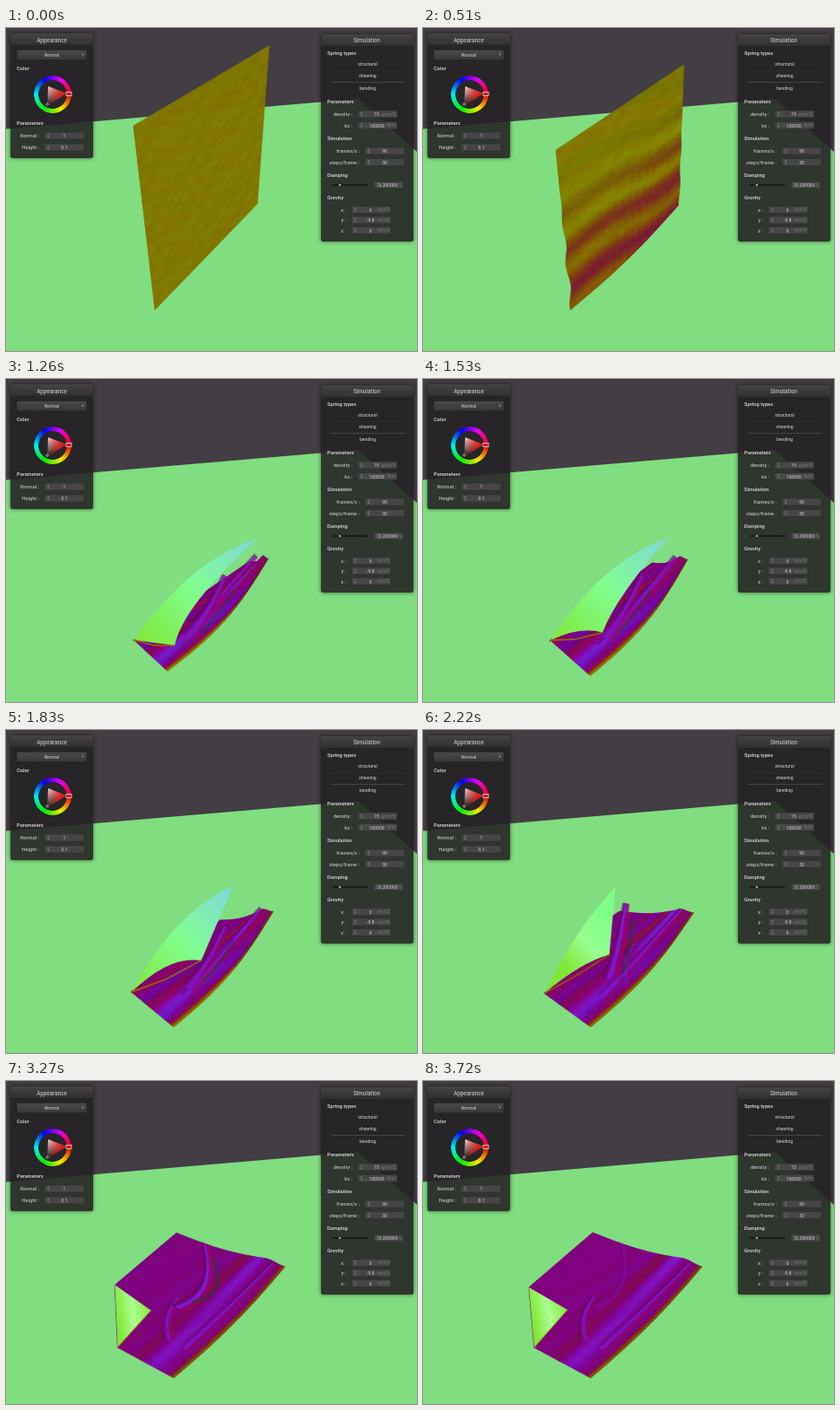
Animation of 458 by 360 pixels, one loop 3.75 s. Source, as an HTML page with a canvas:

```html
<!DOCTYPE html>
<html lang="en">
<head>
<meta charset="utf-8">
<title>Cloth simulation</title>
<style>
  html, body { margin: 0; width: 100%; height: 100%; overflow: hidden; background: #433e43; }
  #stage { position: relative; width: 458px; height: 360px; overflow: hidden; }
  canvas, svg { position: absolute; left: 0; top: 0; display: block; }
  .panel { position: absolute; box-sizing: border-box; border-radius: 2px;
    background: rgba(36, 34, 36, .89); box-shadow: 0 0 4px rgba(0, 0, 0, .6); }
  .panel::before { content: ""; display: block; height: 14px; border-radius: 2px 2px 0 0;
    background: linear-gradient(#444, #303030); border-bottom: 1px solid #242424; box-sizing: border-box; }
  #ring { position: absolute; left: 31px; top: 53px; width: 42px; height: 42px; border-radius: 50%; opacity: .92;
    background: conic-gradient(from 90deg, red, #ff0, #0f0, #0ff, #00f, #f0f, red);
    -webkit-mask: radial-gradient(circle, transparent 15.5px, #000 16.2px);
    mask: radial-gradient(circle, transparent 15.5px, #000 16.2px); }
  text { font-family: Roboto, "Open Sans", sans-serif; font-size: 5px; fill: #b8b8b8; dominant-baseline: central; }
  .title { font-size: 6.3px; font-weight: 500; text-anchor: middle; }
  .head { font-size: 5.7px; font-weight: 700; fill: #c4c4c4; }
  .label { font-size: 5.6px; font-weight: 500; text-anchor: end; }
  .mid { text-anchor: middle; font-weight: 500; }
  .unit { fill: #7c7c7c; font-size: 4.6px; text-anchor: end; }
</style>
</head>
<body>
<div id="stage">
  <canvas id="view" width="458" height="360"></canvas>
  <div class="panel" style="left:5px;top:6px;width:92px;height:139px"></div>
  <div class="panel" style="left:351px;top:7px;width:103px;height:231px"></div>
  <div id="ring"></div>
  <svg id="ui" width="458" height="360" viewBox="0 0 458 360">
    <defs>
      <linearGradient id="btn" x2="0" y2="1"><stop stop-color="#4a4a4a"/><stop offset="1" stop-color="#383838"/></linearGradient>
      <linearGradient id="tri" gradientUnits="userSpaceOnUse" x1="46" y1="66" x2="50" y2="87">
        <stop stop-color="#eee"/><stop offset="1" stop-color="#080808"/></linearGradient>
      <linearGradient id="hue" gradientUnits="userSpaceOnUse" x1="45" y1="76" x2="67" y2="73">
        <stop stop-color="#f00" stop-opacity="0"/><stop offset="1" stop-color="#f00"/></linearGradient>
    </defs>
    <text class="title" x="51" y="13.500">Appearance</text>
    <rect x="12" y="24.500" width="78" height="11" rx="1.500" fill="url(#btn)" stroke="#262626" stroke-width=".6"/>
    <text class="mid" x="51" y="30">Normal</text>
    <path d="M85 28v3l1.500-1.500z" fill="#aaa"/>
    <text class="head" x="12" y="45">Color</text>
    <path d="M67 73L46 87L47 65Z" fill="url(#tri)"/>
    <path d="M67 73L46 87L47 65Z" fill="url(#hue)"/>
    <rect x="67" y="71.500" width="6" height="4" fill="none" stroke="#ddd" stroke-width=".8"/>
    <circle cx="46" cy="85" r="1.300" fill="none" stroke="#ddd" stroke-width=".6"/>
    <text class="head" x="12" y="106">Parameters</text>
    <text class="title" x="402" y="13.500">Simulation</text>
    <text class="head" x="358" y="28">Spring types</text>
    <text class="mid" x="403" y="39.800">structural</text>
    <text class="mid" x="403" y="53.200">shearing</text>
    <text class="mid" x="403" y="66.700">bending</text>
    <path d="M362 47.500h83" stroke="#2e2e2e" stroke-width=".8"/>
    <path d="M362 60.500h83" stroke="#4c4c4c" stroke-width=".8"/>
    <text class="head" x="358" y="82">Parameters</text>
    <text class="head" x="358" y="123">Simulation</text>
    <text class="head" x="358" y="164">Damping</text>
    <path d="M364 175h39" stroke="#1c1c1c" stroke-width="2"/>
    <circle cx="372" cy="175" r="2" fill="#999" stroke="#181818"/>
    <text class="head" x="358" y="189">Gravity</text>
  </svg>
</div>
<script>
const ctx = document.getElementById('view').getContext('2d');
const LOOP = 3750, STEP = 30, ROWS = 64, COLS = 16;
const { PI, sin, cos, sqrt, exp } = Math;

// Number fields: label, value, unit, left, centre y, width
function field(label, value, unit, x, y, w = 44) {
  const mid = x + w * (unit ? .48 : .5);
  document.getElementById('ui').insertAdjacentHTML('beforeend',
    `<text class="label" x="${x - 6}" y="${y}">${label}</text>
     <rect x="${x}" y="${y - 4}" width="${w}" height="8" rx="1" fill="#464646" stroke="#2b2b2b" stroke-width=".5"/>
     <path d="M${x + 3} ${y - .8}l1.200-1.800 1.200 1.800zm0 1.600l1.200 1.800 1.200-1.800z" fill="#888"/>
     <text class="mid" x="${mid}" y="${y}">${value}</text>
     <text class="unit" x="${x + w - 2}" y="${y}">${unit}</text>`);
}
field('Normal :', '1', '', 43, 120);
field('Height :', '0.1', '', 43, 133);
field('density :', '15', 'g/cm^2', 392, 96);
field('ks :', '100000', 'N/m', 392, 108.5);
field('frames/s :', '90', '', 400, 137);
field('steps/frame :', '30', '', 400, 149.5);
field('', '0.200000', '%', 410, 175, 33);
['x', 'y', 'z'].forEach((axis, i) =>
  field(axis + ' :', axis === 'y' ? '-9.8' : '0', 'm/s^2', 385, 202.5 + 11.5 * i));

const clamp = (x, a = 0, b = 1) => Math.min(b, Math.max(a, x));
const smooth = (a, b, x) => { const p = clamp((x - a) / (b - a)); return p * p * (3 - 2 * p); };
const bump = (x, at, w) => exp(-(((x - at) / w) ** 2));
const mix = (a, b, k) => a.length ? a.map((v, i) => v + (b[i] - v) * k) : a + (b - a) * k;
const add = ([x, y], dx, dy) => [x + dx, y + dy];

// Surface colour of a normal pitched by the given angle, with a sideways lean
function shade(pitch, lean = 0, alpha = 1) {
  const n = [lean, sin(pitch), -cos(pitch)].map(c => Math.round(clamp(127.5 * (1 + c), 0, 255)));
  return `rgba(${n},${alpha})`;
}

function line(points) {
  ctx.beginPath();
  points.forEach(p => ctx.lineTo(...p));
}

// Corners and stages of the motion; t in seconds
function pose(t) {
  const land = smooth(1, 1.26, t);
  const open = smooth(1.26, 3.46, t);
  const unfold = smooth(1.8, 2.6, t);
  const swing = sin(PI * sqrt(open)) ** 2;
  const bl = mix([166, 314], [187, 331], smooth(.7, 1.6, t));
  const br = mix([280, 196], [311, 207], clamp(t / 3.2));
  const tip = add(mix([280, 178], [118, 230], open), 0, -25 * sin(PI * open));
  const outer = mix([143, 291], [124, 297], open);
  const inner = add(mix([188, 297], [161, 255], open), 37 * swing, -36 * swing);
  // Free fall of the top edge, then the landed cloth
  const fallL = [142 + 12 * t, 109 + 104 * t * t], fallR = [293 - 5 * t, 20 + 82 * t * t];
  const backR = add(mix([272, 203], [189, 169], sqrt(open)), 0, 25 * swing);
  const tl = mix(fallL, mix(outer, tip, unfold), land);
  const tr = mix(fallR, backR, land);
  const ml = mix(mix(tl, bl, .5), outer, land);
  return { t, land, open, unfold, tip, outer, inner, tl, tr, ml, bl, br };
}

function scene() {
  ctx.fillStyle = '#433e43';
  ctx.fillRect(0, 0, 458, 360);
  ctx.fillStyle = '#80dd80';
  line([[0, 112.5], [392, 79], [458, 138], [458, 360], [0, 360]]);
  ctx.fill();
}

function sheet({ t, land, open, tl, tr, ml, bl, br }) {
  const crumple = Math.min(1.2, (t / .81) ** 2);
  const bow = Math.min(1, crumple) * mix(7, 3, open), sway = 4.5 * crumple * (1 - land);
  const shoulder = add(br, -4 * land, -7 * land);
  const grid = Array.from({ length: ROWS + 1 }, (_, r) => {
    const v = r / ROWS;
    const left = v < .5 ? mix(tl, ml, 2 * v) : mix(ml, bl, 2 * v - 1);
    const right = add(mix(tr, mix(shoulder, br, smooth(.85, 1, v)), v), 0, 5 * land * sin(PI * v));
    const wave = sway * sin(v * 24) * clamp(v * 2.2 - .5);
    return Array.from({ length: COLS + 1 }, (_, c) => {
      const u = c / COLS, b = bow * v * v * sin(PI * u);
      return add(mix(left, right, u), wave * (1 - .7 * u) + b, b);
    });
  });
  const ripple = .08 + .3 * (1 - open);
  ctx.lineWidth = .8;
  ctx.lineJoin = 'round';
  for (let r = 0; r < ROWS; r++) {
    for (let c = 0; c < COLS; c++) {
      const v = (r + .5) / ROWS, u = (c + .5) / COLS;
      const wave = sin(v * 27 - u * 3 + sin(u * 5));
      const grain = .05 * sin(r * .9 + 2 * sin(c * .9)) * sin(c * 1.3 - r * .4);
      const hanging = -.07 + grain
        + crumple * (.75 * wave * clamp(v * 2.2 - .4) - 1.4 * smooth(.3, 1, v));
      const lying = -PI / 2 + ripple * wave * smooth(.1, .6, v)
        - .5 * bump(v, .8, .07) + .35 * bump(v, .68, .05) + 1.2 * smooth(.95, 1, v);
      const lean = .12 * wave * (1 - open) * Math.min(1, crumple);
      ctx.fillStyle = ctx.strokeStyle = shade(mix(hanging, lying, land), lean);
      line([grid[r][c], grid[r][c + 1], grid[r + 1][c + 1], grid[r + 1][c]]);
      ctx.closePath();
      ctx.fill();
      ctx.stroke();
    }
  }
}

// A rounded ridge shaded across its width, tapering to the end
function ridge(from, via, to, width, alpha) {
  const dx = to[0] - from[0], dy = to[1] - from[1], len = Math.hypot(dx, dy);
  const off = (p, d) => add(p, -dy / len * d, dx / len * d);
  ctx.lineWidth = width * .1 + .8;
  ctx.lineCap = 'round';
  for (let k = -1; k <= 1; k += .2) {
    const d = k * width / 2;
    ctx.strokeStyle = shade(-PI / 2 - .75 * cos(k * PI * .9), .25 * k, alpha * (1 - k * k * .7));
    ctx.beginPath();
    ctx.moveTo(...off(from, d * 1.5));
    ctx.quadraticCurveTo(...off(via, d), ...off(to, d * .6));
    ctx.stroke();
  }
}

function ridges({ t, land, open, unfold, inner, bl, br }) {
  ridge(add(bl, 12, -33), add(mix(bl, br, .55), -6, -10), add(br, -14, -3), 9, .5 * land);
  ridge(add(inner, 20, 32), add(inner, 12, 8), add(inner, 30, -14), 11, .55 * unfold);
  // The tall central fold rises, then sinks back
  const sink = smooth(2.64, 3.3, t);
  const base = mix(mix([203, 287], [211, 268], unfold), [192, 252], sink);
  const waist = mix(mix([226, 262], [213, 230], unfold), [236, 238], sink);
  const peak = mix(mix([244, 220], [211, 172], unfold), [222, 182], sink);
  const alpha = land * mix(.6, 1, unfold) * (1 - .8 * smooth(3.2, 3.6, t));
  ridge(base, waist, peak, 12, alpha);
  ctx.strokeStyle = `rgba(24,70,40,${.8 * alpha * (1 - smooth(3.2, 3.5, t))})`;
  ctx.lineWidth = 2.5;
  ctx.beginPath();
  ctx.moveTo(...add(base, 16, -6));
  ctx.quadraticCurveTo(...add(waist, 12, 0), ...add(peak, 9, 16));
  ctx.stroke();
}

function flap({ t, unfold, tip, outer, inner }) {
  const arch = 1 - unfold, young = 1 - smooth(1.26, 1.8, t);
  const side = add(mix(outer, tip, .5), -8 * arch, -32 * arch);
  const fold = add(mix(tip, inner, .6), -28 * young, 4 * young);
  const hem = add(mix(inner, outer, .45), 0, -22 * arch * (1 - young));
  const paint = ctx.createLinearGradient(...mix(outer, mix(outer, tip, .5), unfold), ...mix(tip, inner, unfold));
  paint.addColorStop(0, shade(.95));
  paint.addColorStop(.5, shade(1.7, .35 * unfold));
  paint.addColorStop(1, shade(mix(2.4, 1, unfold)));
  ctx.save();
  ctx.globalAlpha = smooth(1.1, 1.26, t);
  ctx.translate(0, -95 * Math.max(0, 1.26 ** 2 - t * t));
  ctx.fillStyle = paint;
  ctx.strokeStyle = shade(-.1, .2, mix(.9, .4, unfold));
  ctx.lineWidth = 1.6;
  ctx.beginPath();
  ctx.moveTo(...outer);
  ctx.quadraticCurveTo(...side, ...tip);
  ctx.quadraticCurveTo(...fold, ...inner);
  ctx.quadraticCurveTo(...hem, ...outer);
  ctx.fill();
  line([inner, add(mix(inner, outer, .5), 0, 3 * arch), outer]);
  ctx.stroke();
  ctx.restore();
}

function frame(now) {
  const p = pose(Math.floor(now % LOOP / STEP) * STEP / 1000);
  scene();
  sheet(p);
  if (p.land > 0) {
    ridges(p);
    flap(p);
  }
  requestAnimationFrame(frame);
}
requestAnimationFrame(frame);
</script>
</body>
</html>
```
